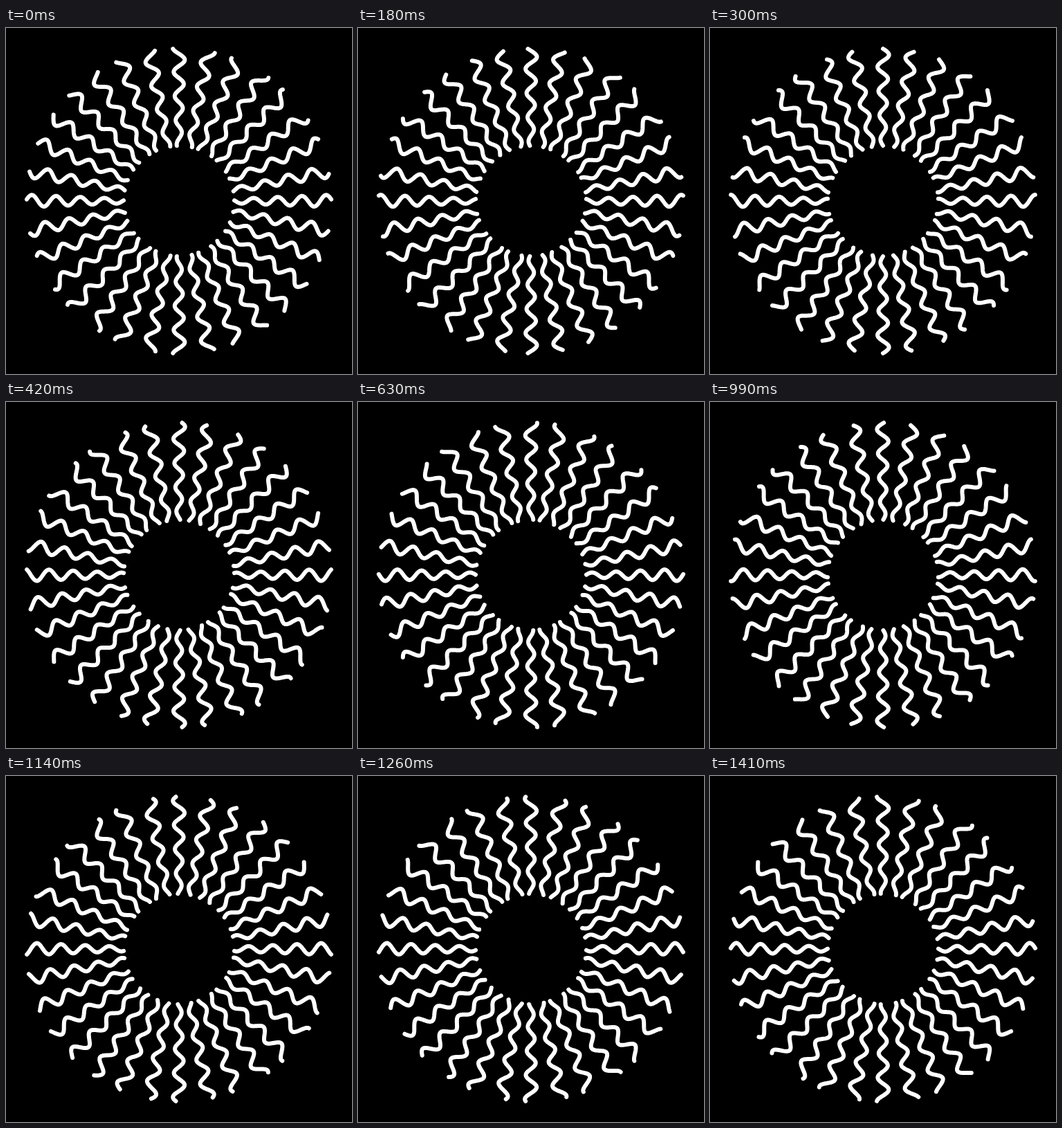
Write an HTML page with a canvas that moves like this. It is 500 px wide and 500 px high and loops after 1.44 s.

```html
<!DOCTYPE html>
<html lang="en">
<head>
<meta charset="utf-8">
<title>Radial waves</title>
<style>
  html, body { margin: 0; height: 100%; overflow: hidden; background: #000; }
  canvas { display: block; }
</style>
</head>
<body>
<canvas id="stage" width="500" height="500"></canvas>
<script>
const ctx = document.getElementById('stage').getContext('2d');
const TAU = 2 * Math.PI;
const LOOP = 1440, STEP = 30;
const RAYS = 32, INNER = 80, OUTER = 220, WAVELENGTH = 35;
const SWING = 0.041; // angular amplitude in radians

function drawRay(index, turn) {
  const base = index / RAYS;
  const mirror = index % 2 ? 1 : -1;
  ctx.beginPath();
  for (let r = INNER; r <= OUTER; r++) {
    const phase = turn - base + (OUTER - r) / WAVELENGTH;
    const angle = TAU * base + mirror * SWING * Math.cos(TAU * phase);
    ctx.lineTo(250 + r * Math.sin(angle), 250 - r * Math.cos(angle));
  }
  ctx.stroke();
}

function draw() {
  const time = Math.floor(performance.now() % LOOP / STEP) * STEP;
  const turn = (time + 2 * STEP) / LOOP;
  ctx.fillStyle = '#000';
  ctx.fillRect(0, 0, 500, 500);
  ctx.strokeStyle = '#fff';
  ctx.lineWidth = 6;
  ctx.lineCap = ctx.lineJoin = 'round';
  for (let i = 0; i < RAYS; i++) drawRay(i, turn);
  requestAnimationFrame(draw);
}
draw();
</script>
</body>
</html>
```
